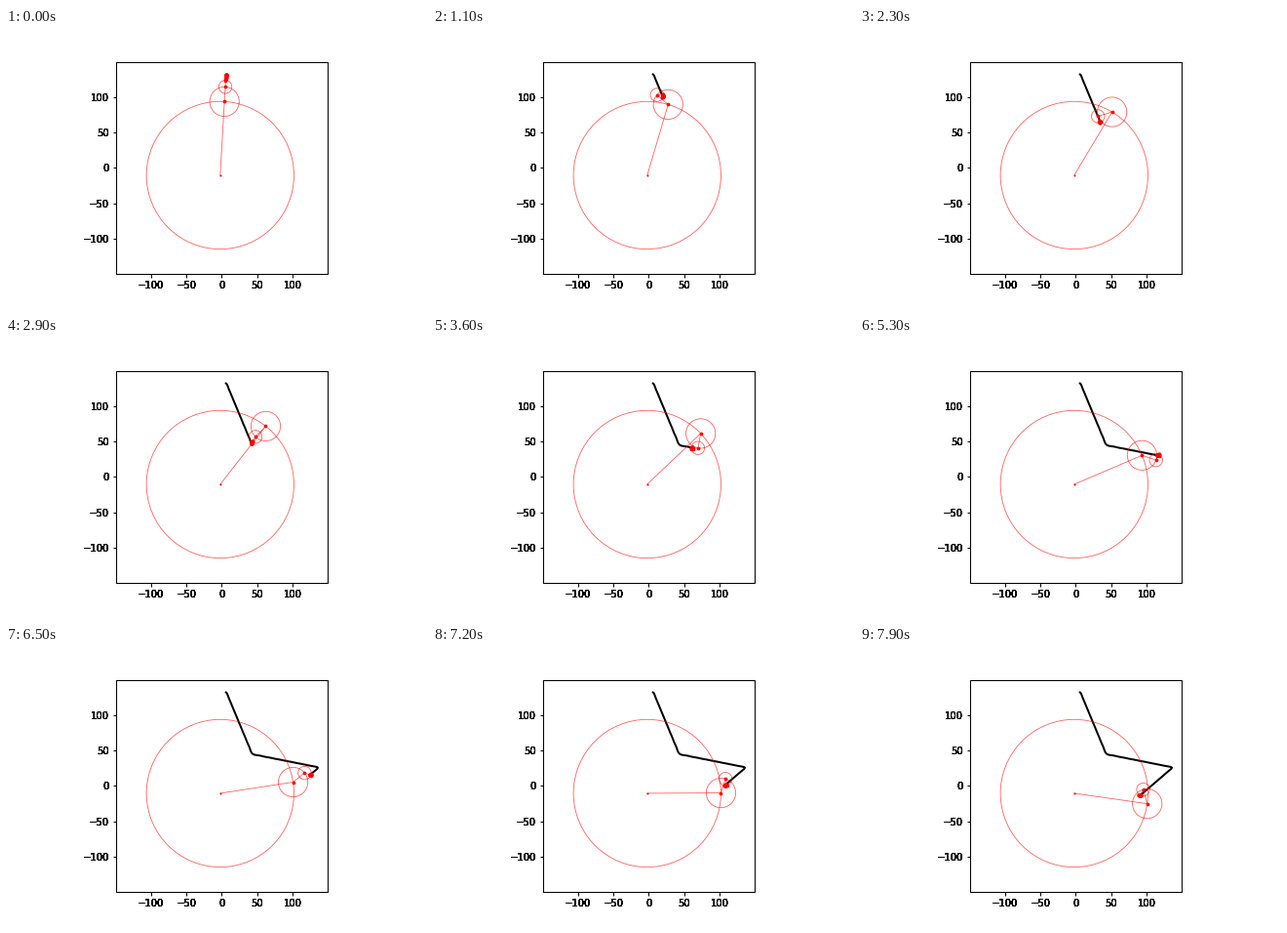
Write a matplotlib script that moves like this. It is 432 px wide and 288 px high and loops after 8000 ms.

```python
import numpy as np
import matplotlib.pyplot as plt
from matplotlib.animation import FuncAnimation
from matplotlib.patches import Circle

FRAMES, STEPS_PER_TURN = 80, 300
CENTER = -2.2 - 10.6j
OUTER, INNER = 144.3, 71.5          # star vertex radii
TILT = np.radians(86.7)             # direction of the first vertex
TICKS = range(-100, 101, 50)
LAYERS = 8                          # stacked labels look hard-edged

# Fourier series of a five-pointed star, traced clockwise
freqs = np.array(sorted((5 * m - 1 for m in range(-12, 14)), key=abs))
amps = np.where(freqs % 2, OUTER + INNER, OUTER - INNER) / 2
amps = amps * np.sinc(freqs / 10) ** 2


def joints(n):
    """Chain of arm end points, from the fixed centre to the pen."""
    t = 2 * np.pi * n / STEPS_PER_TURN
    arms = amps * np.exp(1j * (TILT + freqs * t))
    return CENTER + np.concatenate(([0], np.cumsum(arms)))


path = np.array([joints(n)[-1] for n in range(FRAMES)])

fig = plt.figure(figsize=(6, 4), dpi=72, facecolor="white")
fig.subplots_adjust(left=0.125, right=0.9, bottom=0.125, top=0.88)
ax = fig.add_subplot(aspect="equal", xlim=(-150, 150), ylim=(-150, 150))
ax.set_xticks(TICKS, [])
ax.set_yticks(TICKS, [])
ax.tick_params(width=1)
for spine in ax.spines.values():
    spine.set_linewidth(1)


def label(text, xy, coords, offset, ha, va):
    for _ in range(LAYERS):
        ax.annotate(text, xy, xycoords=coords, xytext=offset, size=10,
                    textcoords="offset points", ha=ha, va=va)


for v in TICKS:
    text = str(v).replace("-", "\u2212")
    label(text, (v, 0), ax.get_xaxis_transform(), (0, -7), "center", "top")
    label(text, (0, v), ax.get_yaxis_transform(), (-7, 0), "right",
          "center_baseline")

thin = dict(lw=0.8, alpha=0.65, zorder=3)
trace, = ax.plot([], [], color="black", lw=2, zorder=2)
circles = [ax.add_patch(Circle((0, 0), r, fill=False, ec="red", **thin))
           for r in amps]
arms, = ax.plot([], [], color="red", **thin)
ax.plot(CENTER.real, CENTER.imag, "ro", ms=1, zorder=4)
dots, = ax.plot([], [], "ro", ms=2.7, zorder=4)


def update(n):
    pts = joints(n)
    for circle, c in zip(circles, pts):
        circle.set_center((c.real, c.imag))
    arms.set_data(pts.real, pts.imag)
    dots.set_data(pts[1:].real, pts[1:].imag)
    trace.set_data(path[:n + 1].real, path[:n + 1].imag)
    return [trace, *circles, arms, dots]


anim = FuncAnimation(fig, update, frames=FRAMES, interval=100,
                     repeat=True, repeat_delay=0, blit=False)
plt.show()
```
